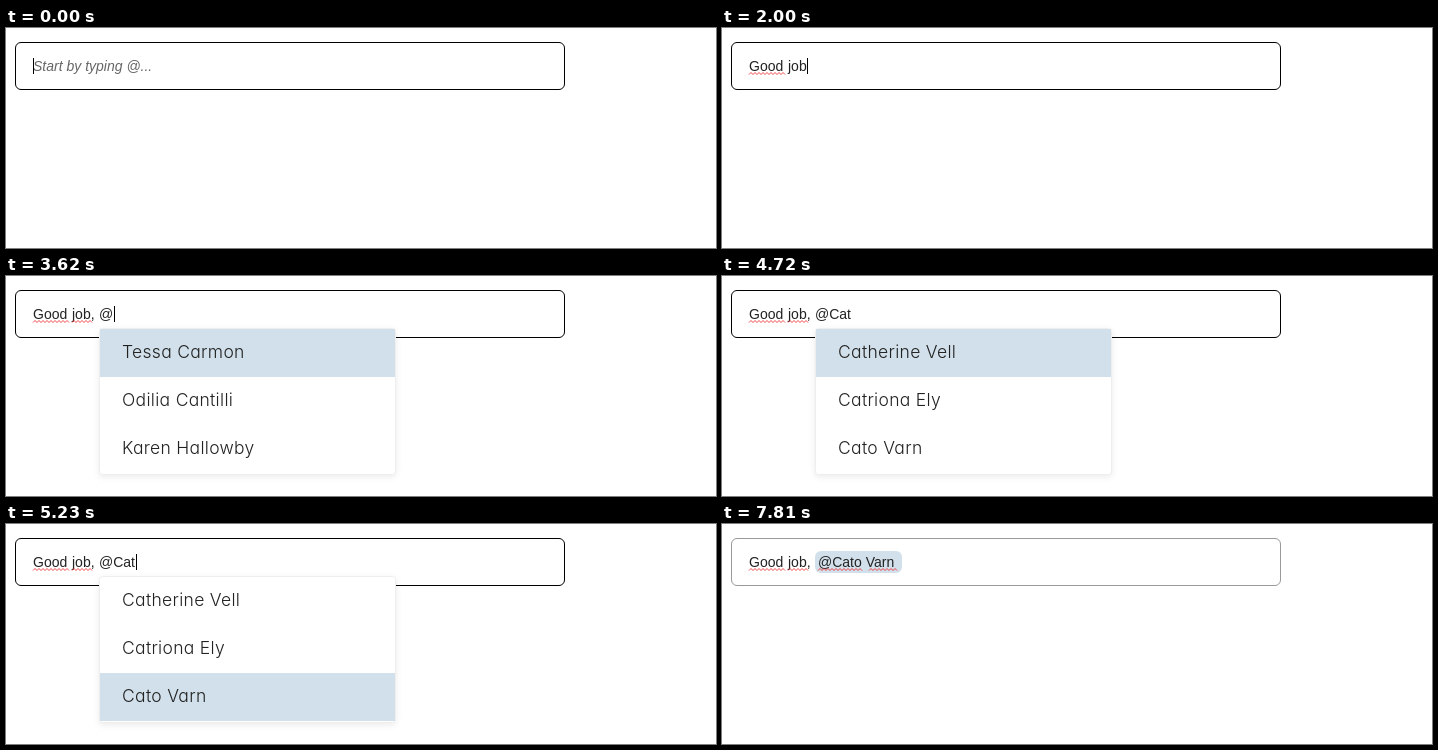
Animation of 710x220 px, one loop 7860 ms. Source, as an HTML page:

```html
<!DOCTYPE html>
<html lang="en">
<head>
<meta charset="utf-8">
<title>Mention input</title>
<style>
html, body { margin: 0; width: 100%; height: 100%; overflow: hidden; background: #fff; }
svg { display: block; }
text { font: 14px "Liberation Sans", Arial, sans-serif; fill: #222; }
.hint { font-style: italic; fill: #666; }
.name { font: 300 17.5px Inter, sans-serif; letter-spacing: .3px; font-feature-settings: "cv11"; }
.menu { fill: #fff; stroke: #eee; filter: drop-shadow(0 2px 3px rgba(0, 0, 0, .08)); }
.wave { fill: none; stroke: #e33; stroke-width: .9; }
.tint { fill: #d1e0ea; }
</style>
</head>
<body>
<svg id="stage" width="710" height="220" viewBox="0 0 710 220"></svg>
<script>
const LOOP = 7860, PICK = 5640, BLUR = 7810;
const MESSAGE = 'Good job, @Cat';
const PEOPLE = ['Tessa Carmon', 'Odilia Cantilli', 'Karen Hallowby',
  'Catherine Vell', 'Catriona Ely', 'Cato Varn'];
const keyTimes = [740, 1110, 1210, 1440, 1570, 1770, 1890, 2000, 2550, 2780, 3620, 3980, 4130, 4210];
const caretX = [27, 38, 46, 54, 62, 65, 69, 77, 85, 89, 93, 108, 118, 126, 130];
const caretOff = [[510, 740], [3290, 3620], [4720, 5230], [6150, 6710], [7220, 7730], [BLUR, LOOP]];
const wordX = [27, 66, 93];

const stage = document.getElementById('stage');
const text = (x, y, s, cls = '') => `<text x="${x}" y="${y}" class="${cls}">${s}</text>`;
const rect = (x, y, w, h, attrs) => `<rect x="${x}" y="${y}" width="${w}" height="${h}" ${attrs}/>`;
const wave = (x, w) => `<path class="wave" d="M${x} 46.5${'l2-2l2 2'.repeat(Math.round(w / 4))}"/>`;

function menu(query, active) {
  const names = PEOPLE.filter(name => name.includes(query)).slice(0, 3);
  return rect(93.5, 52.5, 296, 146, 'rx="3" class="menu"') +
    rect(94, 53 + 48 * active, 295, 48, 'class="tint"') +
    names.map((name, i) => text(116, 82 + 48 * i, name, 'name')).join('');
}

function scene(t) {
  const picked = t >= PICK;
  const count = keyTimes.filter(k => k <= t).length;
  const words = MESSAGE.slice(0, count).split(' ');
  const checked = !picked || t >= PICK + 50;
  let out = rect(9.5, 14.5, 549, 47, `rx="5.5" fill="#fff" stroke="${t < BLUR ? '#000' : '#999'}"`);

  if (picked) {
    words.pop();
    out += rect(93, 27, 87, 22, 'rx="6" class="tint"') + text(96, 43, '@' + PEOPLE[5]);
    if (checked) out += wave(96, 44) + wave(147, 28);
  }
  out += count ? words.map((word, i) => text(wordX[i], 43, word)).join('')
    : text(27, 43, 'Start by typing @...', 'hint');
  if (checked && t >= 1570) out += wave(27, 35);
  if (checked && t >= 2600) out += wave(66, 20);

  if (!caretOff.some(([from, to]) => t >= from && t < to))
    out += rect(picked ? 183 : caretX[count], 30, 1, 16, 'fill="#000"');
  if (count > 10 && !picked)
    out += menu(words[2].slice(1), t < 4950 ? 0 : t < 5050 ? 1 : 2);
  return out;
}

let shown = '';
function draw() {
  const next = scene(performance.now() % LOOP);
  if (next !== shown) stage.innerHTML = shown = next;
  requestAnimationFrame(draw);
}
draw();
</script>
</body>
</html>
```
